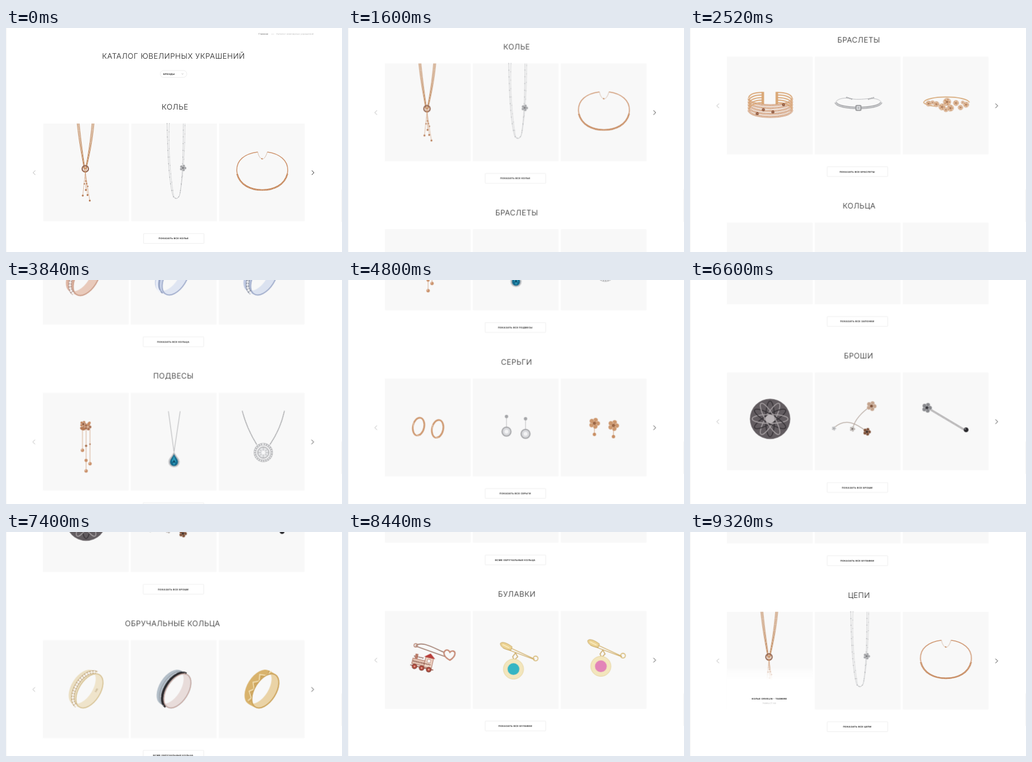
An HTML page for the animation above (10000 ms loop, 600x401 px).

```html
<!DOCTYPE html>
<html lang="ru">
<head>
<meta charset="utf-8">
<title>Каталог</title>
<style>
  html, body { margin: 0; width: 100%; height: 100%; overflow: hidden; background: #fff; }
  svg { display: block; width: 600px; height: 401px; }
  text { font-family: Inter, "Open Sans", sans-serif; text-rendering: geometricPrecision; }
  .title { font-size: 13.4px; font-weight: 300; letter-spacing: .5px; fill: #1c1c1c; text-anchor: middle; }
  .label { font-size: 4px; font-weight: 700; letter-spacing: .4px; fill: #1c1c1c; text-anchor: middle; }
  .crumb { font-size: 4px; letter-spacing: .15px; }
</style>
</head>
<body>
<svg id="stage" viewBox="0 0 600 401"></svg>
<script>
const GOLD = '#c98f64', SILVER = '#bcbdc0', CARD = '#f8f8f8';
const PITCH = 297.2, TOP = 171, STEP = 13.448, LOOP = 10000;

// Drawing helpers; jewels use card coordinates (153 x 175).
const line = (d, c, w, more = '') =>
  `<path d="${d}" fill="none" stroke="${c}" stroke-width="${w}" ${more}/>`;
const beads = (d, c, w, gap) =>
  line(d, c, w, `stroke-linecap="round" stroke-dasharray="0 ${gap}"`);
const shape = (d, c, more = '') => `<path d="${d}" fill="${c}" ${more}/>`;
const dot = (x, y, r, c, more = '') => `<circle cx="${x}" cy="${y}" r="${r}" fill="${c}" ${more}/>`;
const oval = (x, y, rx, ry, a, c, more = '') =>
  `<ellipse rx="${rx}" ry="${ry}" transform="translate(${x} ${y}) rotate(${a})" fill="${c}" ${more}/>`;
const box = (x, y, w, h, c, more = '') =>
  `<rect x="${x}" y="${y}" width="${w}" height="${h}" fill="${c}" ${more}/>`;
const move = (x, y, body) => `<g transform="translate(${x} ${y})">${body}</g>`;
const edge = (c, w) => `stroke="${c}" stroke-width="${w}"`;
const pave = (d, c, w) => line(d, c, w) + beads(d, '#f6ebe3', w * .5, w * .8);

function flower(x, y, r, c, heart) {
  let out = '';
  for (let i = 0; i < 5; i++) {
    const a = i * Math.PI * .4 - 1.2;
    out += dot(x + r * .6 * Math.cos(a), y + r * .6 * Math.sin(a), r * .42, c, edge('#fff', .4));
  }
  return out + dot(x, y, r * .28, heart);
}

// Necklaces
const lariat = () => {
  let out = '';
  for (const s of [0, 1.8, 3.6])
    out += line(`M${60.5 + s} 0C${64 + s} 35 ${69 + s * .6} 58 ${73 + s * .4} 82`, '#c28a5d', 1) +
           line(`M${87 + s} 0C${84 + s} 32 ${80 + s * .6} 58 ${75 + s * .4} 82`, '#c28a5d', 1);
  const tails = [[70.5, 129], [76, 119], [79, 128], [83, 138]];
  for (const [x, y] of tails)
    out += beads(`M75 87L${x} ${y}`, GOLD, 1.1, 1.6) + dot(x, y, 1.7, '#b67a54') +
           dot((75 + x) / 2 + .5, (87 + y) / 2, 1.2, '#b67a54');
  return out + dot(75, 81, 5.6, 'none', edge('#8b5d48', 2.2)) +
    beads('M75 75.4a5.6 5.6 0 1 1-.1 0', '#c9a08a', .8, 2) + line('M72 78l3 10 3-10', GOLD, 1.2);
};
const strand = () => {
  const a = 'M64 0C65 50 67 100 74 128C77 137 84 137 87 126C92 95 93 45 93 0';
  const b = 'M68 0C66 45 70 95 76 130C79 136 83 134 86 130C93 100 96 45 96 0';
  return line(a, SILVER, .7) + line(b, '#c9cacc', .7) + beads(a, '#aeb0b3', 1.7, 12) +
    beads(b, '#b9babd', 1.5, 15) + flower(92.5, 79.5, 6, '#a5a6a9', '#77787b');
};
const collar = () => {
  const d = 'M69 51C45 54 31 66 31.5 84C33 108 55 119 77 119C100 119 121 108 122.5 84C123 66 108 54 86 51';
  const low = 'M32 90C37 110 56 119 77 119C98 119 117 110 122 90';
  return line(d, '#cf9670', 1.6) + line(low, '#c18256', 2.7) + beads(low, '#e9c4a7', 1.4, 3) +
    line('M69 51C70 58 74 63 77 64C81 63 84 58 86 51', '#c9a488', .7) + dot(76.5, 63, 1.2, GOLD);
};

// Bracelets
const cuffBand = () => {
  let out = '';
  for (let i = 0; i < 5; i++) {
    const y = 5.2 * i, t = 64 + 4.6 * i;
    out += line(`M63 ${t}C48 ${t} 39 ${68 + y} 38.5 ${75 + y}M90 ${t}C106 ${t} 116 ${68 + y} 116.5 ${75 + y}`, '#dba878', 2) +
      pave(`M38.5 ${75 + y}C41 ${91 + y} 114 ${91 + y} 116.5 ${75 + y}`, '#cf9a76', 3.5);
  }
  out += line('M64 63V85M89 63V85', '#d9a674', 4.4);
  for (const [x, y] of [[101, 86], [65, 95], [82, 99], [54, 102]])
    out += dot(x, y, 2.6, '#8a5138') + dot(x, y, 1, '#c59a7e');
  return out;
};
const bangle = () =>
  line('M37 82C40 75 50 74 60 74C72 78 85 76 97 75C108 74 117 77 118.5 82', '#b4b5b8', .9) +
  beads('M57 73L66 76M96 76L106 73', '#a2a3a6', 2.4, 3) +
  line('M37 82C41 95 114 95 118.5 82', '#9d9ea1', 4) +
  beads('M37 82C41 95 114 95 118.5 82', '#e9eaec', 1.7, 2) +
  box(72.5, 86.5, 10.5, 10.5, '#8f9093', 'rx="2"') + box(74.3, 88.3, 6.9, 6.9, '#e3e4e6', 'rx="1"') +
  box(76, 90, 3.5, 3.5, '#b6b8bb');
const blossom = () => {
  let out = line('M37 82C42 69 113 69 119 82M37 82C40 86 50 88 60 89', '#d7a877', 1.7);
  const parts = [[46, 84, 5], [60, 85, 5], [53, 82, 3.5], [79, 81, 7], [70, 90, 6], [85, 92, 6],
    [95, 83, 5], [103, 91, 4.5], [113, 86, 5], [107, 82, 3], [77, 95, 4]];
  for (const [x, y, r] of parts)
    out += dot(x, y, r * .95, '#ecd0b2', edge('#c48f66', .8)) + flower(x, y, r * .9, '#cf9c72', '#9a6544');
  return out;
};

// Rings: outer wall, visible inner wall, near rim.
const ARC = 'M96.5 58.3A20 35 32 0 0 59.5 117.7';
let clips = 0;
function ring(outer, inner, rim, deco) {
  const id = 'hole' + clips++;
  let out = '';
  for (let i = 0; i < 6; i++)
    out += oval(71 + 2.4 * i, 84 + 1.3 * i, 20, 35, 32, outer);
  const hole = oval(83, 90.5, 18, 33, 32, inner);
  return `<clipPath id="${id}">${hole}</clipPath>` + out + deco + hole +
    `<g clip-path="url(#${id})">${oval(71, 84, 18, 33, 32, CARD)}</g>` +
    oval(83, 90.5, 19, 34, 32, 'none', edge(rim, 1.5));
}
const gems = (c) => line(ARC, c, 6) + beads(ARC, '#fff', 4.4, 5) + beads(ARC, c, 1.2, 5);
const roseRing = () => move(-5, 2, ring('#dfb5a2', '#e9cabb', '#c99a86', gems('#a98a80')));
const blueRing = () => move(-3, 1, ring('#c9d2e8', '#dfe5f2', '#98a5c6',
  line(ARC, '#8795b8', 2) + line(ARC, '#eef2fb', 3, 'transform="translate(-4 -2)"')));
const iceRing = () => move(-2, 1, ring('#bfc9e2', '#dbe2f0', '#99a6c6', gems('#7d8496')));
const paleRing = () => ring('#ebdfc2', '#efe4cb', '#d6c193', gems('#c0a67c')) +
  '<text x="93" y="92" font-size="4" fill="#a58b5c" transform="rotate(-60 95 91)">585</text>';
const stripeRing = () => ring('#b3bec8', '#e8dcda', '#cda99f',
  line(ARC, '#2c2a2d', 4.2, 'transform="translate(2.5 1.4)"') +
  beads(ARC, '#e5e5e5', 1.4, 17) + line(ARC, '#8d939b', 1, 'transform="translate(-2.5 -1.4)"'));
const waveRing = () => ring('#d9b36c', '#ead3a6', '#c9a058',
  line('M94 55L85 63 73 61 72 73 61 75 63 87 54 91 58 103 52 108', '#f3e3bb', 1.6) +
  line('M90 54L86 66 76 64 74 76 64 78 65 90 57 93 60 105 54 111', '#b98e48', .8));

// Pendants
const spray = () => {
  let out = '';
  for (const [x, y, top] of [[70.5, 103, 64], [77, 140, 62], [84, 127, 60]])
    out += line(`M${x} ${top}V${y}`, '#cf9c76', .8) + dot(x, y, 3, '#c98f68') + dot(x - 1, y - 1, 1, '#f0d3bd');
  return out + dot(77, 121, 2.8, '#cb9169') + dot(77, 95, 2, '#a86e4b') + dot(84, 92, 1.3, '#a86e4b') +
    flower(72, 56, 6, '#c0855f', '#7d4a33') + flower(80, 61, 6.5, '#a96f50', '#e0b797') +
    oval(82, 55, 4, 2.5, -50, '#c78c64') + oval(71, 64, 5, 3, 20, '#b67a56');
};
const drop = () => line('M67 33L77 106L88 33', '#a8a9ac', .9) +
  shape('M77 105C80 113 87 117 87 124A10 9.5 0 0 1 67 124C67 117 74 113 77 105Z', '#aaacb0') +
  beads('M77 106C80 113 86 118 86 124A9 8.5 0 0 1 68 124C68 118 74 113 77 106', '#f3f3f4', 1.4, 2.2) +
  shape('M77 110C79 115 84 119 84 124A7 7 0 0 1 70 124C70 119 75 115 77 110Z', '#126a8e') +
  shape('M77 113L81 123 77 130 73 122Z', '#2f9cba') + shape('M77 120L80 125 74 125Z', '#0b4666');
const halo = () => line('M42 33C48 56 58 77 68 93M117 33C112 56 102 77 91 93', '#a9aaad', 1.1) +
  beads('M42 33C48 56 58 77 68 93M117 33C112 56 102 77 91 93', '#8d8e91', 1.5, 3) +
  dot(79.5, 107, 15, '#f1f1f2', edge('#aeafb2', 4)) +
  beads('M79.5 92a15 15 0 1 1-.1 0', '#f2f2f3', 2.6, 4) +
  dot(79.5, 107, 10, '#e4e5e7', edge('#8f9093', 1)) +
  line('M72 101L87 113M72 113L87 101M79.5 97V117M69.5 107H89.5', '#a9aaad', .8) + dot(79.5, 107, 3.5, '#f7f7f8');

// Earrings
const pair = (draw) => move(-17, 0, draw()) + move(17, 4, draw());
const hoops = () => pair(() => oval(77, 86, 10, 16, 12, 'none', edge('#cf9a72', 3)) +
  beads('M68 80C68 95 72 103 79 102', '#fff', 1.4, 2.4));
const studs = () => pair(() => line('M77 68V88', SILVER, 1) + dot(77, 68, 3, '#a5a6a9') +
  dot(77, 95, 8, '#d9dadd', edge('#a4a5a8', 2)) + dot(77, 95, 3.5, '#f4f4f5'));
const leaves = () => pair(() => flower(77, 80, 10, '#cc976e', '#9a6544') + dot(77, 100, 3, GOLD) +
  line('M77 86V98', GOLD, .8));

// Cufflinks
const button = (x, y, rx, ry, a, rim, face) =>
  oval(x + 1, y + 1, rx, ry, a, rim) + oval(x - .3, y - .3, rx - 1.4, ry - 1.2, a, face);
const stem = (x, y, bx, by, c) => line(`M${x} ${y}L${bx} ${by}`, c, 3) +
  oval(bx, by, 7, 2.6, 35, c) + oval(bx, by - .6, 4.5, 1.2, 35, '#f3e6d4');
const onyx = () => stem(60, 91, 84, 89, '#c99443') + stem(98, 84, 83, 76, '#c99443') +
  button(56, 94.5, 12, 12.5, 0, '#b9a07c', '#29282c') + button(102, 87.5, 12.5, 12, 0, '#b9a07c', '#29282c') +
  dot(56, 94, 2.7, '#e3c9ac') + dot(102, 87, 2.7, '#e3c9ac');
const smoky = () => stem(66, 83, 73, 76, '#d3a26f') + stem(95, 89, 86, 82, '#d3a26f') +
  button(58, 86, 12.5, 14, -35, '#cb966b', '#ecd4bb') + button(102, 92, 12.5, 14, 35, '#cb966b', '#ecd4bb') +
  oval(58.5, 87, 8.5, 10, -35, '#7b503a') + oval(101.5, 92, 8.5, 10, 35, '#80543c') +
  shape('M53 83L62 81 60 91Z', '#b58a6b') + shape('M97 90L106 87 102 98Z', '#bd9475');
const slate = () => stem(65, 92, 75, 90, '#b3adad') + stem(95, 83, 79, 76, '#b3adad') +
  button(59, 97.5, 13.5, 15, 15, '#b8b5b8', '#2b2c38') + button(98, 82, 12.5, 14, 15, '#b8b5b8', '#2b2c38') +
  line('M51 96L66 99M91 80L105 83', '#484957', .8);

// Brooches
const orb = () => {
  let out = dot(77, 83, 36, '#625c60');
  for (let i = 0; i < 6; i++)
    out += oval(77, 83, 8, 32, i * 30, 'none', edge(i % 2 ? '#aaa4a6' : '#343034', 1.6));
  return out + dot(77, 83, 8, '#bbb5b7');
};
const twig = () => line('M34 99C55 80 75 92 93 106M68 100C70 85 85 70 100 60', '#b2a49b', 1.2) +
  flower(93, 106, 7, '#7e5138', '#3b2b26') + flower(34, 100, 4, '#b9babc', '#8a8b8d') +
  flower(67, 101, 5, '#b8b2ae', '#655a55') + flower(101, 60, 9, '#c4a48e', '#80543c');
const rod = () => pave('M42 62L109 102', '#a3a4a8', 3.2) + dot(113, 102.5, 4.3, '#29282c') +
  dot(111.5, 101, 1.2, '#8b8b90') + flower(43, 63, 9, '#88898d', '#35343a');

// Safety pins
const train = () => line('M55 62C66 53 86 66 108 75M55 63L111 83', '#9f7a6c', 1.6) +
  dot(55, 61.5, 3.2, 'none', edge('#b88876', 1.5)) +
  shape('M116 88C104 82 103 73 109 70C113 69 115 72 116 74C119 70 125 71 125 76C125 81 121 85 116 88Z', CARD, edge('#c58772', 2.4)) +
  `<g transform="rotate(13 66 95)">` + box(48, 88, 24, 10, '#e3c1b1', edge('#a96957', 1)) +
  box(70, 81, 14, 18, '#f0d6c7', edge('#a96957', 1)) + shape('M67 81L77 73 87 81Z', '#b83f3c') +
  box(74, 84, 6, 6, CARD, edge('#b88171', .8)) + beads('M50 84H66M50 93H82', '#7d4c40', 2.2, 3) +
  box(51, 79, 5, 9, '#b87966') + line('M46 101H88', '#9a594a', 1.6) +
  [54, 67, 80].map(x => dot(x, 102, 4.2, '#b74a3e', edge('#83463a', 1.3)) + dot(x, 102, 1.3, '#efc8b6')).join('') + '</g>';
const charm = (c) => line('M52 59L110 86M54 66L110 87', '#d2b16c', 1.3) +
  shape('M49 58C52 54 61 57 70 64L68 70C60 70 49 66 49 58Z', '#ecd394', edge('#bd984d', .8)) +
  line('M53 60L65 66', '#fff4ce', 1.4) + dot(112, 85, 4.2, 'none', edge('#d6b873', 1.6)) +
  line('M76 75L80 82 74 88 71 82Z', '#c9a65e', 1.5) +
  dot(72.5, 104, 18, '#f3e6bd', edge('#e3cd90', .8)) + dot(72.5, 104, 10.5, c);
const skyPin = () => charm('#35b5c4');
const pinkPin = () => move(-1, -5, charm('#e384b8'));

const necklaces = [lariat, strand, collar];
const ALL = 'ПОКАЗАТЬ ВСЕ ';
const sections = [
  ['КОЛЬЕ', 301.3, ALL + 'КОЛЬЕ', necklaces],
  ['БРАСЛЕТЫ', 301.3, ALL + 'БРАСЛЕТЫ', [cuffBand, bangle, blossom]],
  ['КОЛЬЦА', 302, ALL + 'КОЛЬЦА', [roseRing, blueRing, iceRing]],
  ['ПОДВЕСЫ', 299, ALL + 'ПОДВЕСЫ', [spray, drop, halo]],
  ['СЕРЬГИ', 301, ALL + 'СЕРЬГИ', [hoops, studs, leaves]],
  ['ЗАПОНКИ', 301.7, ALL + 'ЗАПОНКИ', [onyx, smoky, slate]],
  ['БРОШИ', 301, ALL + 'БРОШИ', [orb, twig, rod]],
  ['ОБРУЧАЛЬНЫЕ КОЛЬЦА', 297.5, 'ВСМЕ ОБРУЧАЛЬНЫЕ КОЛЬЦА', [paleRing, stripeRing, waveRing]],
  ['БУЛАВКИ', 301.5, ALL + 'БУЛАВКИ', [train, skyPin, pinkPin]],
  ['ЦЕПИ', 301.8, ALL + 'ЦЕПИ', necklaces]
];
const text = (cls, x, y, s, more = '') => `<text class="${cls}" x="${x}" y="${y}" ${more}>${s}</text>`;

const section = ([title, x, label, items], i) => move(0, TOP + PITCH * i,
  text('title', x, -25.3, title) +
  items.map((item, n) => move(66 + 157 * n, 0, box(0, 0, 153, 175, CARD) + item())).join('') +
  line('M51.8 84l-4 4 4 4', '#b4b4b4', 1) + line('M545.4 84l4 4-4 4', '#333', 1) +
  box(245, 197, 108, 17.6, '#fff', 'rx=".5" ' + edge('#ececec', .9)) +
  text('label', 298.7, 207.4, label));

const header =
  text('crumb', 450.5, 12.4, 'Главная', 'fill="#777" font-weight="500"') + line('M473 11H478', '#ccc', .6) +
  text('crumb', 482.5, 12.4, 'Каталог ювелирных украшений', 'fill="#b8b8b8"') +
  text('title', 298.6, 54.6, 'КАТАЛОГ ЮВЕЛИРНЫХ УКРАШЕНИЙ') +
  box(274.8, 76, 47.5, 12.4, '#fff', 'rx="6.2" ' + edge('#e8e8e8', .8)) +
  text('label', 290.6, 83.7, 'БРЕНДЫ') + line('M313 81.5l1.6 1.4 1.6-1.4', '#999', .6);

const caption = move(66, TOP + PITCH * 9, '<g id="caption" opacity="0">' +
  box(-.5, 100, 154, 22, 'url(#veil)') + box(-.5, 121.5, 154, 54, '#fff') +
  text('label', 75.7, 157, 'КОЛЬЕ ORVELIN - TASMIRE') +
  text('crumb', 75.5, 164.8, '7466LCT.50', 'fill="#bbb" text-anchor="middle"') + '</g>');

const stage = document.getElementById('stage');
stage.innerHTML = `<defs><linearGradient id="veil" x2="0" y2="1">
  <stop offset="0" stop-color="#fff" stop-opacity="0"/><stop offset=".15" stop-color="#fff" stop-opacity=".45"/>
  <stop offset="1" stop-color="#fff"/></linearGradient></defs>
  <g id="page">${header}${sections.map(section).join('')}${caption}</g>` +
  box(0, 0, 1, 401, '#f3f3f3') + box(599, 289, 1, 58, '#f3f3f3');

// Rest, steady scroll in 40 ms ticks, rest.
const at = (ms, x, n, easing = 'step-end') =>
  ({ offset: ms / LOOP, transform: `translate(${x}px, ${-STEP * n}px)`, easing });
const loop = { duration: LOOP, iterations: Infinity };
document.getElementById('page').animate([
  at(0, .6, 0), at(1320, 0, 1, 'steps(200, end)'), at(9320, 0, 201), at(LOOP, 0, 201)
], loop);
document.getElementById('caption').animate([
  { offset: 0, opacity: 0, easing: 'step-end' },
  { offset: .912, opacity: 0, easing: 'steps(5, end)' },
  { offset: .932, opacity: 1 },
  { offset: 1, opacity: 1 }
], loop);
</script>
</body>
</html>
```
